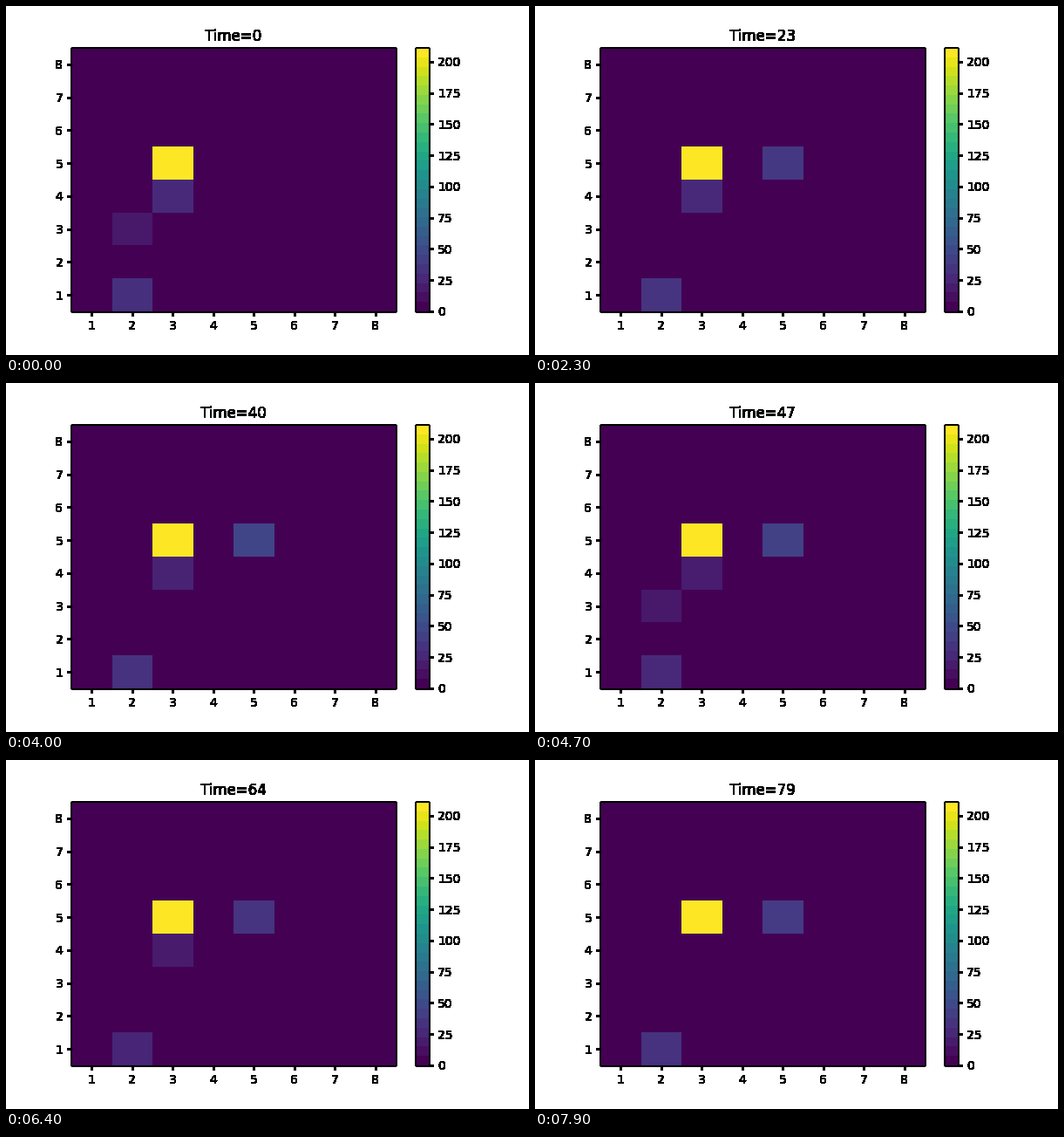
These frames come from a looping animation (600x400 px, 8000 ms). A matplotlib script:

```python
import numpy as np
import matplotlib.pyplot as plt
from matplotlib.animation import FuncAnimation
from matplotlib.cm import ScalarMappable

FRAMES, SIZE, PEAK = 80, 8, 211


def during(t, span, *starts):
    """True while t lies in one of the stays that begin at starts."""
    return any(0 <= t - s < span for s in starts)


def ramp(t, times, values):
    return round(np.interp(t, times, values))


def grid(t):
    """Counts per cell: two slow pools, and groups passing between them."""
    z = np.zeros((SIZE + 1, SIZE + 1))      # indexed [row, column] from 1
    z[5, 3] = PEAK
    z[1, 2] = ramp(t, (13, 34, 56, 79), (29, 35, 17, 30))
    z[2, 2] = 14 * during(t, 4, 42, 75)
    z[3, 2] = 14 * during(t, 12, -4, 46)
    z[4, 3] = ramp(t, (34, 47, 72), (24, 16, 14)) * during(t, 58, -48, 18)
    z[5, 5] = ramp(t, (13, 34, 56, 72, 79),
                   (24, 44, 39, 24, 37)) * during(t, FRAMES, 7)
    z[5, 6] = 14 * during(t, 4, 42, 58)
    return z[1:, 1:]


def harden(img, dpi):
    """Make every touched pixel fully opaque."""
    img = img.copy()
    img[..., 3] = img[..., 3] > 0
    return img, 0, 0


plt.rcParams["font.family"] = "DejaVu Sans"
fig, ax = plt.subplots(figsize=(6, 4), dpi=100)
fig.subplots_adjust(bottom=0.125)

edges = np.arange(SIZE + 1) + 0.5
mesh = ax.pcolormesh(edges, edges, grid(0), cmap="viridis", vmin=0, vmax=PEAK)
ax.set_xticks(range(1, SIZE + 1))
ax.set_yticks(range(1, SIZE + 1))
title = ax.set_title("Time=0")

scale = ScalarMappable(plt.Normalize(0, PEAK), plt.get_cmap("viridis", 28))
bar = fig.colorbar(scale, ax=ax)
bar.set_ticks(range(0, 201, 25))

# Hard outer rim behind each panel; the soft inner side stays on top
for panel in (ax, bar.ax):
    panel.patch.set(edgecolor="black", linewidth=0.8)
    for art in (panel.patch, panel.xaxis, panel.yaxis):
        art.set_agg_filter(harden)
title.set_agg_filter(harden)


def update(t):
    mesh.set_array(grid(t))
    title.set_text(f"Time={t}")
    return mesh, title


anim = FuncAnimation(fig, update, frames=FRAMES, interval=100,
                     repeat=True, repeat_delay=0, blit=False)
plt.show()
```
